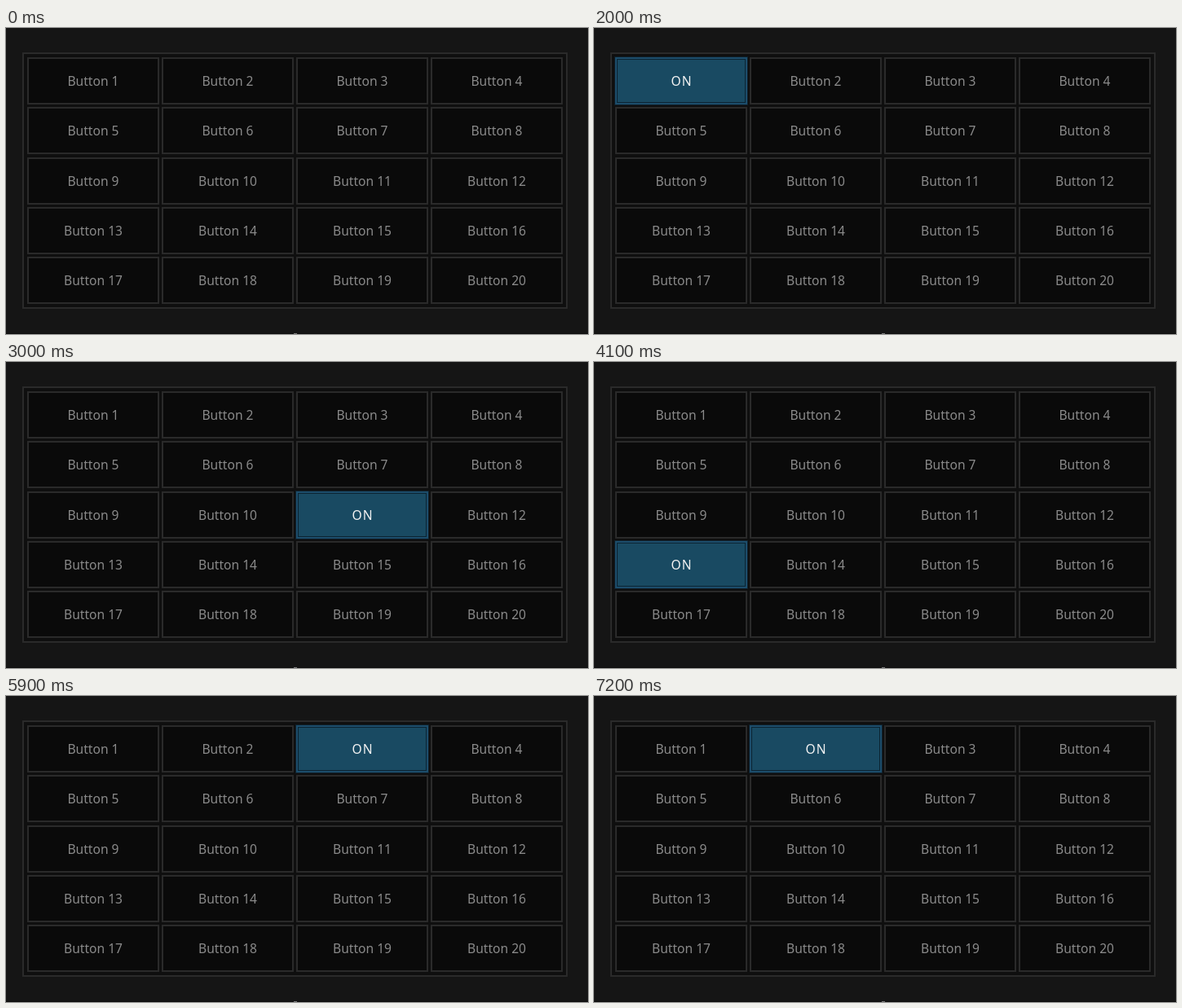
These frames come from a looping animation (714x376 px, 8 s). An HTML page with a canvas:

```html
<!DOCTYPE html>
<html lang="en">
<head>
<meta charset="utf-8">
<title>Button grid</title>
<style>
  html, body { margin: 0; width: 100%; height: 100%; overflow: hidden; background: #151515; }
  canvas { display: block; }
</style>
</head>
<body>
<canvas id="stage" width="714" height="376"></canvas>
<script>
const ctx = document.getElementById("stage").getContext("2d");
const LOOP = 8000;
const COLS = 4, COUNT = 20, WIDTH = 162, HEIGHT = 58;

// [start in ms, number of the lit button]
const presses = [[0, 0], [1100, 1], [2600, 11], [4100, 13], [5900, 3], [7200, 2]];

function box(x, y, w, h, fill, border) {
  ctx.fillStyle = border;
  ctx.fillRect(x, y, w, h);
  ctx.fillStyle = fill;
  ctx.fillRect(x + 2, y + 2, w - 4, h - 4);
}

function label(text, x, y, color, spacing) {
  ctx.font = "15.6px 'Noto Sans', 'Open Sans', sans-serif";
  ctx.letterSpacing = spacing + "px";
  ctx.textAlign = "center";
  ctx.fillStyle = color;
  ctx.fillText(text, x + spacing / 2, y);
}

function drawButton(number, lit) {
  const i = number - 1;
  const x = 26 + 165 * (i % COLS);
  const y = Math.round(36 + 61.25 * Math.floor(i / COLS));
  if (lit) {
    ctx.fillStyle = "#10202b";
    ctx.fillRect(x - 1, y - 1, WIDTH + 2, HEIGHT + 2);
    box(x, y, WIDTH, HEIGHT, "#0b2433", "#1c4d6b");
    ctx.fillStyle = "#194a62";
    ctx.fillRect(x + 3, y + 3, WIDTH - 6, HEIGHT - 6);
    label("ON", x + WIDTH / 2, y + 35, "#f2f2f2", 1);
  } else {
    box(x, y, WIDTH, HEIGHT, "#0a0a0a", "#2a2a2a");
    label("Button " + number, x + WIDTH / 2, y + 35, "#8a8a8a", 0);
  }
}

function drawBottomEdge() {
  ctx.fillStyle = "#0d0d0d";
  ctx.fillRect(0, 375, 714, 1);
  ctx.fillStyle = "#777";
  ctx.fillRect(353, 375, 4, 1);
}

function draw(now) {
  const time = now % LOOP;
  const active = presses.filter(([start]) => start <= time).pop()[1];
  ctx.fillStyle = "#151515";
  ctx.fillRect(0, 0, 714, 376);
  box(20, 30, 669, 315, "#0f0f0f", "#2a2a2a");
  for (let n = 1; n <= COUNT; n++) drawButton(n, n === active);
  drawBottomEdge();
}

const begin = performance.now();
function tick() {
  draw(performance.now() - begin);
  requestAnimationFrame(tick);
}
tick();
</script>
</body>
</html>
```
